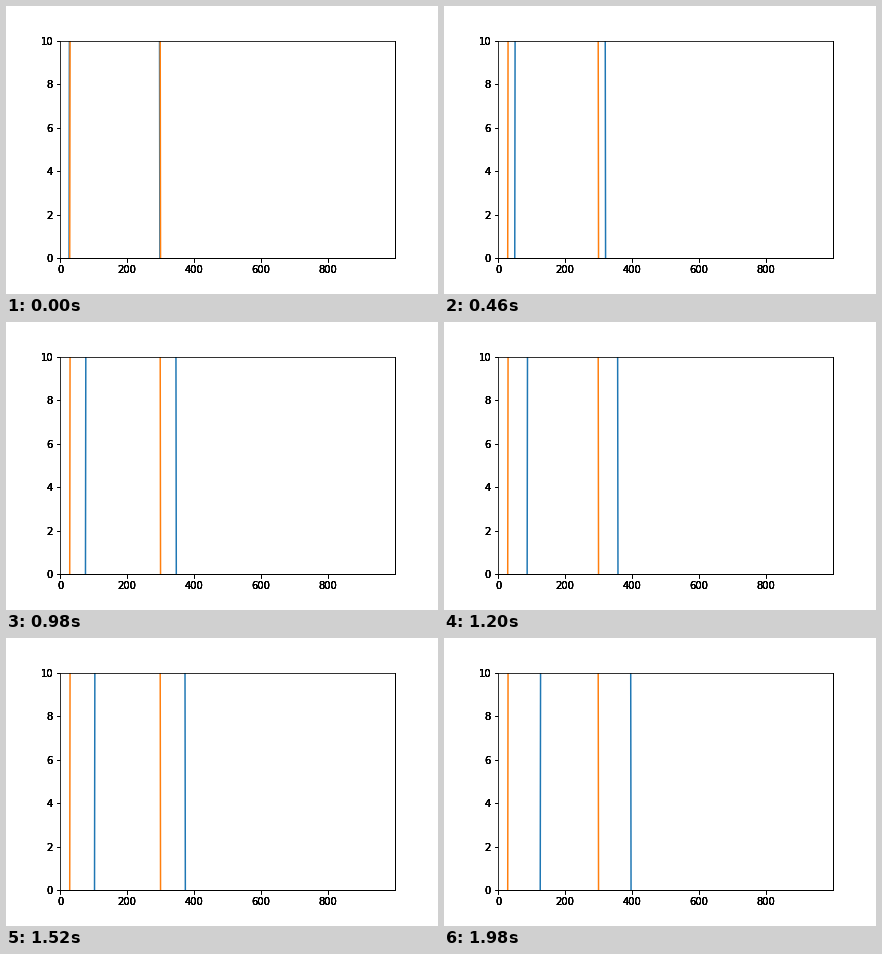
These frames come from a looping animation (432x288 px, 2000 ms). A matplotlib script:

```python
import matplotlib.pyplot as plt
import numpy as np
from matplotlib.animation import FuncAnimation

FRAMES = 100
INTERVAL = 20
SPAN = 999
HEIGHT = 10
WIDTH = 270
BOX = [0.125, 0.125, 0.775, 0.755]

plt.rcParams.update({"font.family": "DejaVu Sans", "font.size": 10})
fig = plt.figure(figsize=(6, 4), dpi=72, facecolor="white")


def make_axes():
    ax = fig.add_axes(BOX)
    ax.set_xlim(0, SPAN)
    ax.set_ylim(0, HEIGHT)
    ax.set_xticks(range(0, SPAN, 200))
    ax.set_yticks(range(0, HEIGHT + 1, 2))
    return ax


def edges(start):
    """Rising and falling edge of a pulse, each one sample wide."""
    end = start + WIDTH
    x = [start, start + 1, np.nan, end, end + 1]
    y = [0, HEIGHT, np.nan, HEIGHT, 0]
    return x, y


# Stacked axes darken the antialiased labels and frame.
for _ in range(4):
    make_axes()
ax = make_axes()

moving, = ax.plot(*edges(27), color="C0", lw=1.5)
ax.plot(*edges(29), color="C1", lw=1.5)


def update(i):
    moving.set_data(*edges(27 + i))
    return moving,


anim = FuncAnimation(fig, update, frames=FRAMES, interval=INTERVAL,
                     repeat=True, repeat_delay=0, blit=False)
plt.show()
```
